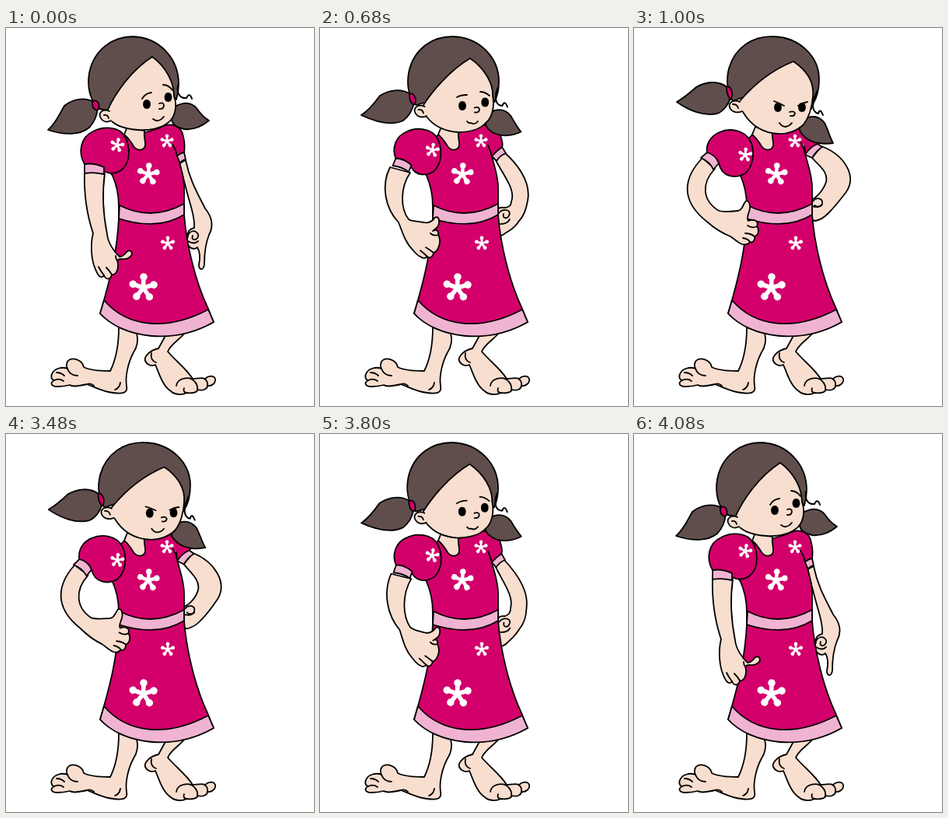
An HTML page that plays this animation: 396x486 px, repeating every 4.96 s.

```html
<!DOCTYPE html>
<html lang="en">
<head>
<meta charset="utf-8">
<title>Girl putting her hands on her hips</title>
<style>
  html, body { margin: 0; width: 100%; height: 100%; overflow: hidden; background: #fff; }
  svg { display: block; width: 396px; height: 486px; }
  path { stroke: #000; stroke-width: 1.8; stroke-linejoin: round; stroke-linecap: round; fill: none; }
  .skin { fill: #f8decf; }
  .hair { fill: #604e4c; }
  .dress { fill: #d3006b; }
  .trim { fill: #f0b4d2; }
  .plain { stroke: none; }
  .eye { fill: #000; }
  .curl { stroke-width: 2; }
</style>
</head>
<body>
<!-- Moving parts: relaxed pose in d/transform, optional halfway pose in data-mid, hands on hips in data-to. -->
<svg viewBox="0 0 396 486">
  <defs>
    <g id="petal">
      <path d="M0 0V-7" style="stroke:#fff;stroke-width:3"/>
      <circle cy="-7.4" r="2.5" fill="#fff"/>
    </g>
    <g id="flower">
      <use href="#petal"/>
      <use href="#petal" transform="rotate(72)"/>
      <use href="#petal" transform="rotate(144)"/>
      <use href="#petal" transform="rotate(216)"/>
      <use href="#petal" transform="rotate(288)"/>
    </g>
  </defs>

  <g id="legs">
    <path class="skin" d="M145 385C145 405 142 425 134 441C122 441 108 440 100 436C98 426 84 422 79 429C77 433 78 436 79 438C72 435 63 438 60 443C57 447 58 452 62 453C56 456 58 461 66 461C74 461 78 460 82 459C86 462 95 460 104 458C115 462 125 468 138 469C150 471 157 469 155 460C153 448 157 430 164 417C170 408 170 400 168 392Z"/>
    <path d="M79 438Q82 447 92 447M62 453Q69 450 74 454M65 443Q71 443 75 447M104 458Q109 456 113 460M147 456Q146 463 140 465"/>
    <path class="skin" d="M207 392L196 412C186 414 177 422 179 428C182 434 188 435 192 433C197 444 201 460 212 467C217 472 227 472 232 469C238 470 245 469 247 465C253 467 259 464 259 460C265 461 270 456 269 451C267 446 260 447 256 451C252 449 244 451 240 451C232 438 218 428 208 416C212 406 224 400 230 392Z"/>
    <path d="M219 460C220 450 236 447 242 454Q247 459 246 465M232 469Q227 468 229 463M259 460Q260 454 255 451M187 418Q185 427 193 430"/>
  </g>

  <g id="far-arm">
    <path class="skin"
      d="M231 170C236 195 246 212 256 232C265 243 267 255 261 266C257 276 255 290 255 304C254 312 248 312 248 304C250 295 249 287 246 282C240 288 228 278 234 268C233 262 236 258 242 257C243 248 240 238 238 230C232 210 228 192 223 174Z"
      data-mid="M237 160C252 173 272 197 267 222C265 234 262 242 256 248C250 258 244 260 238 264C234 267 231 268 229 267C227 262 226 258 226 252C226 246 226 242 226 238C227 232 231 230 237 231C241 231 246 229 246 223C252 208 236 190 226 170Z"
      data-to="M241 152C270 163 288 190 272 212C265 221 257 231 250 238C245 243 241 246 236 247C233 249 230 247 229 246C226 244 225 242 224 240C222 238 222 234 224 230C225 224 229 220 233 218C239 213 244 207 247 198C250 185 238 177 229 167Z"/>
    <path
      d="M234 266C240 256 251 264 246 270C243 274 238 272 240 267M234 274Q242 279 247 274"
      data-mid="M230 238C236 231 247 234 243 241C241 246 234 245 236 239M232 252Q241 252 244 246"
      data-to="M229 224C235 216 243 219 242 226C241 230 236 231 232 228M229 229Q237 232 242 227"/>
  </g>

  <g id="dress">
    <path class="dress" d="M152 137C130 160 128 180 137 190Q145 208 145 230V246Q190 260 229 240V205C229 190 224 178 221 165C218 150 210 138 203 127L180 134Z"/>
    <path class="dress" d="M145 245Q190 260 229 240C232 278 243 325 260 361L267 378C215 407 150 398 121 367C135 320 143 285 145 245Z"/>
    <path class="trim" d="M126 350C155 384 205 391 260 362L267 378C215 408 150 399 121 367Z"/>
    <path class="trim" d="M146 228Q187 249 229 226V240Q195 261 145 245Z"/>
    <path class="dress"
      d="M198 128C212 120 226 126 228 140C230 148 230 154 229 160L220 165C219 158 217 154 214 150"
      data-mid="M199 128C213 121 227 127 232 138C234 145 236 149 234 153L221 165C219 158 218 154 216 151"
      data-to="M200 128C214 124 228 130 234 138C238 143 240 146 236 149L220 163C220 158 220 155 219 152"/>
    <path class="trim"
      d="M229 160L231 169Q226 170 224 174L220 165Q223 161 229 160Z"
      data-mid="M234 153L239 161Q231 164 227 171L221 165Q227 158 234 153Z"
      data-to="M236 149L242 153Q234 158 229 167L220 163Q226 153 236 149Z"/>
    <path class="skin" d="M156 127L152 137C157 141 161 147 164 152C170 160 180 157 179 148C179 144 177 141 178 132Z"/>
    <use href="#flower" transform="translate(183 188) scale(1.5) rotate(4)"/>
    <use href="#flower" transform="translate(176.500 334) scale(1.9) rotate(2)"/>
    <use href="#flower" transform="translate(208 277) scale(.95)"/>
    <use href="#flower" transform="translate(207 145.500) scale(.9)"/>
  </g>

  <path class="hair"
    d="M217 101C228 95 238 95 245 103C251 112 256 116 261 119C250 128 238 131 229 130C220 128 214 124 213 118Z"
    data-to="M218 118C228 111 238 113 245 122C250 132 252 141 256 148C244 150 230 148 222 142C214 136 211 130 213 125Z"/>

  <g id="near-arm">
    <path class="skin"
      d="M101 185C100 215 104 240 112 264C109 275 109 292 113 305C115 311 117 316 120 319C123 321 125 320 126 318C129 325 135 323 136 317C142 318 146 308 143 299C144 298 146 297 148 297C155 298 160 295 162 291C162 286 158 285 155 288C152 292 149 294 146 294C139 288 131 276 130 265C125 240 123 215 127 187Z"
      data-mid="M90 179C78 203 84 232 101 250C106 262 109 275 119 285C124 291 126 293 129 294C133 297 136 296 138 294C142 297 146 293 146 289C152 287 157 275 152 266C153 261 150 258 145 261C148 258 154 256 153 248C153 242 148 242 146 246C142 250 138 251 134 250C125 248 118 249 114 246C103 232 103 205 116 186Z"
      data-to="M88 167C66 190 56 220 95 250C104 258 114 264 124 268C130 272 134 276 139 278C143 279 147 278 149 275C153 277 156 272 155 268C161 266 161 258 158 255C161 248 154 245 147 248C143 243 150 236 149 229C148 221 144 221 142 225C139 231 138 234 134 235C125 236 115 237 109 235C88 222 86 200 104 181Z"/>
    <path
      d="M126 318Q122 313 119 307M136 317Q133 312 129 308M143 299Q141 297 141 293"
      data-mid="M138 294Q134 290 129 286M146 289Q141 285 136 282M152 266Q146 268 142 264"
      data-to="M149 275Q147 271 140 270M155 268Q150 264 143 264M158 255Q152 258 146 254"/>
    <path class="dress"
      d="M101 175C92 160 96 140 112 133C124 126 146 126 153 140C160 153 160 172 150 181C143 188 133 188 126 184Z"
      data-to="M94 161C92 150 98 139 110 134C123 128 143 131 150 146C156 160 153 178 143 187C130 194 113 192 109 174Z"/>
    <path class="trim"
      d="M101 175Q113 173 126 179L126 188Q113 185 101 187Z"
      data-to="M94 160Q105 163 109 174L102 182Q98 172 86 167Z"/>
    <use href="#flower" transform="translate(143 150.500) scale(.95) rotate(12)" data-mid="translate(144.500 157) scale(.95) rotate(9)" data-to="translate(143 163) scale(.95) rotate(6)"/>
  </g>

  <g id="head">
    <path class="hair"
      d="M113 95C100 88 85 92 75 100C68 113 62 124 54 131C75 138 95 138 107 128C115 120 117 112 118 103Z"
      data-mid="M116 85C104 77 88 80 77 87C69 98 61 107 53 112C72 121 92 126 107 119C115 113 119 105 121 96Z"
      data-to="M120 76C108 67 92 69 80 76C70 85 62 91 55 95C70 106 90 114 107 110C115 107 122 98 124 89Z"/>
    <path class="hair"
      d="M120 104C108 94 104 76 107 58C113 27 138 11 163 11C198 12 222 40 222 72Q222 82 219 92L188 60L135 107Z"
      data-to="M127 94C120 82 118 68 122 52C130 25 152 10 180 11C212 12 238 36 238 66C238 85 230 98 228 104L205 65L145 98Z"/>
    <path class="skin"
      d="M188 37C206 50 216 70 216 88C221 100 217 116 208 122C198 130 182 132 170 131C155 130 142 126 135 119L131 105C140 85 160 55 188 37Z"
      data-mid="M193 39C212 52 223 72 222 87C225 101 221 116 213 122C205 131 190 134 178 134C162 133 147 127 137 114L133 99C144 82 166 55 193 39Z"
      data-to="M205 43C220 53 232 68 230 88C229 100 225 115 218 124C210 132 197 137 185 136C168 135 152 128 140 108L136 94C148 80 172 56 205 43Z"/>
    <path class="skin plain"
      d="M134 107C126 103 119 108 121 114C124 121 130 122 138 119Z"
      data-to="M138 95C128 91 121 96 123 102C125 108 133 110 141 107Z"/>
    <path
      d="M133 107C126 103 119 108 121 114C124 121 130 122 135 119M126 112Q131 111 132 116"
      data-to="M136 95C128 91 121 96 123 102C125 108 133 110 139 107M127 98Q133 98 134 103"/>
    <path class="dress"
      d="M111 95Q116 91 119 97Q121 104 117 106Q110 104 111 95Z"
      data-to="M119 76Q123 73 126 82Q127 89 124 92Q119 86 119 76Z"/>
    <path class="curl"
      d="M221 74C219 84 224 91 232 90Q236 82 239 91"
      data-to="M236 80C228 96 228 108 237 110Q239 102 243 112"/>
    <path class="eye plain"
      d="M181 92C187.500 92 187.500 104 181 104C174.500 104 174.500 92 181 92Z"
      data-to="M185 96C191.500 96 191.500 108 185 108C178.500 108 178.500 96 185 96Z"/>
    <path class="eye plain"
      d="M208.500 83C215 83 215 95 208.500 95C202 95 202 83 208.500 83Z"
      data-to="M216 96C222.500 96 222.500 108 216 108C209.500 108 209.500 96 216 96Z"/>
    <path
      d="M175 91Q179 84 187 83M202 73Q209 73 214 80"
      data-mid="M176 89Q181 86 189 86M206 82Q212 82 218 87"
      data-to="M180 94Q186 96 193 100M211 100Q217 96 223 95"/>
    <path
      d="M197 97Q203 95 203 100Q202 105 197 104"
      data-to="M200 108Q206 106 207 110Q206 114 201 113"/>
    <path
      d="M189 117Q193 120 196 119Q200 118 203 114"
      data-mid="M189 120Q191 123 194 122Q199 125 203 120"
      data-to="M187 122Q190 127 195 127Q200 126 203 122"/>
  </g>
</svg>
<script>
  const LOOP = 4960, STEP = 40, STEPS = 16, RAISE = 400, LOWER = 3480;
  const NUMBER = /-?(?:\d*\.\d+|\d+)/g;

  const parts = [...document.querySelectorAll("[data-to]")].map(el => {
    const attr = el.tagName === "path" ? "d" : "transform";
    const template = el.getAttribute(attr);
    const poses = [template, el.dataset.mid, el.dataset.to]
      .filter(Boolean)
      .map(text => text.match(NUMBER).map(Number));
    return { el, attr, template, poses };
  });

  // Share of the move completed, advancing once every STEP ms.
  function progress(time, start) {
    const done = Math.floor((time - start) / STEP) + 1;
    return Math.min(Math.max(done / STEPS, 0), 1);
  }

  function pose(amount) {
    for (const { el, attr, template, poses } of parts) {
      const place = amount * (poses.length - 1);
      const index = Math.min(Math.floor(place), poses.length - 2);
      const from = poses[index], to = poses[index + 1];
      let i = 0;
      el.setAttribute(attr, template.replace(NUMBER, () => {
        const value = from[i] + (to[i] - from[i]) * (place - index);
        i++;
        return value.toFixed(2);
      }));
    }
  }

  function frame() {
    const time = performance.now() % LOOP;
    pose(progress(time, RAISE) - progress(time, LOWER));
    requestAnimationFrame(frame);
  }
  frame();
</script>
</body>
</html>
```
